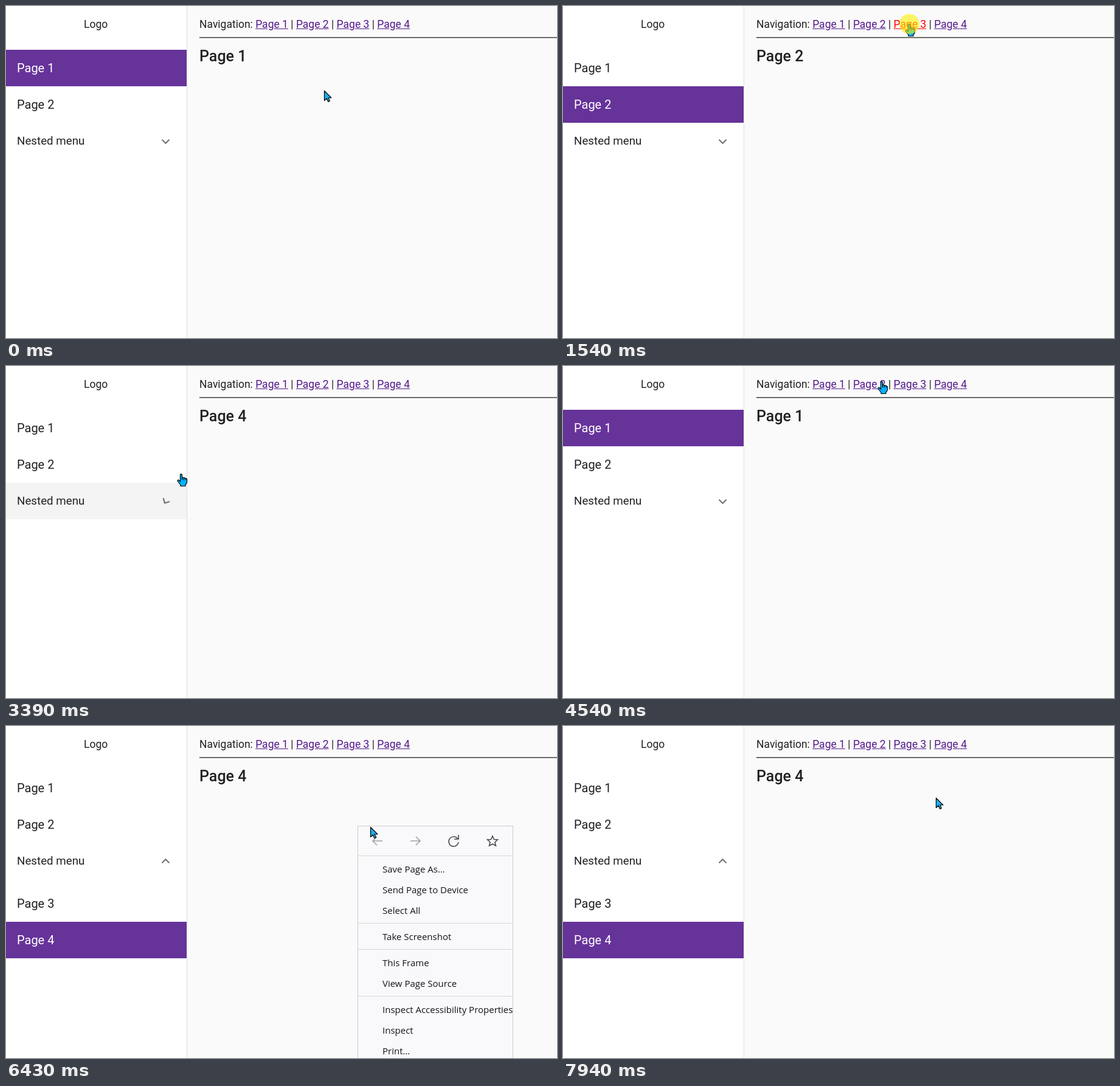
An HTML page that plays this animation: 906 px wide and 546 px high, repeating every 8 s.

```html
<!DOCTYPE html>
<html lang="en">
<head>
<meta charset="utf-8">
<title>Sidebar navigation</title>
<style>
  html, body { margin: 0; width: 100%; height: 100%; overflow: hidden; background: #fff; }
  #stage { position: relative; width: 906px; height: 546px; overflow: hidden; background: #fefefe;
    font-family: Roboto, sans-serif; color: #212121; }
  #stage div, #stage svg { position: absolute; }
  #app { inset: 0; background: #fff; }
  #main { left: 298px; top: 0; width: 608px; height: 545px; background: #fafafa; }
  #side { left: 0; top: 0; width: 297px; height: 545px; background: #fff; border-right: 1px solid #e0e0e0; }
  #logo { left: 128px; top: 15px; font-size: 17.5px; line-height: 30px; }
  #nav { left: 20px; top: 15px; font-size: 17.5px; line-height: 30px; white-space: nowrap; }
  #nav span { color: #551a8b; text-decoration: underline; }
  #nav span.pressed { color: #f00; }
  #rule { left: 20px; top: 51px; width: 588px; height: 1px; background: #555; border-bottom: 1px solid #888; }
  #title { left: 20px; top: 67px; font-size: 25px; line-height: 31px; font-weight: 500; white-space: nowrap; }
  .item { left: 0; width: 279px; padding-left: 18px; height: 60px; line-height: 60px; font-size: 20px; white-space: nowrap; }
  .item.active { background: #639; color: #fff; }
  #nested { top: 192px; font-size: 18.75px; }
  #nested.hover { background: #f4f4f4; }
  #panel { left: 0; top: 252px; width: 297px; overflow: hidden; }
  #menu { left: 578px; top: 164px; width: 254px; height: 400px; background: #f9f9fb; border: 1px solid #ccc;
    font: 15px "Open Sans", sans-serif; color: #15141a; }
  #menu .row { left: 40px; line-height: 34px; white-space: nowrap; }
  #menu .line { left: 0; width: 254px; height: 1px; background: #d8d8dc; }
  #reload { left: 128px; top: 3px; width: 58px; height: 42px; border-radius: 4px; }
  #reload.hover { background: #e0e0e6; }
  #spot { left: -16.5px; top: -16.5px; width: 33px; height: 33px; border-radius: 50%; background: rgba(255, 238, 0, .6); }
  #pointer { left: 0; top: 0; width: 0; height: 0; }
  #pointer svg { left: 0; top: 0; width: 1px; height: 1px; overflow: visible; }
  #pointer path { stroke: #000; stroke-width: 1.2; stroke-linejoin: round; }
</style>
</head>
<body>
<div id="stage">
  <div id="app">
    <div id="main">
      <div id="nav">Navigation: <span>Page 1</span> | <span>Page 2</span> | <span>Page 3</span> | <span>Page 4</span></div>
      <div id="rule"></div>
      <div id="title"></div>
    </div>
    <div id="side">
      <div id="logo">Logo</div>
      <div class="item page" style="top:72px">Page 1</div>
      <div class="item page" style="top:132px">Page 2</div>
      <div class="item" id="nested">Nested menu</div>
      <svg width="297" height="60" style="left:0;top:192px">
        <path id="chevron" d="M-6 -2.8L0 3.2L6 -2.8" fill="none" stroke="#757575" stroke-width="2.2"/>
      </svg>
      <div id="panel">
        <div class="item page" style="top:10px">Page 3</div>
        <div class="item page" style="top:70px">Page 4</div>
      </div>
    </div>
  </div>
  <div id="menu">
    <div id="reload"></div>
    <svg width="254" height="48" fill="none" stroke="#4a4a52" stroke-width="1.6" style="left:0;top:0">
      <path d="M40 24H24M31 17L24 24L31 31" opacity=".5"/>
      <path d="M86 24H102M95 17L102 24L95 31" opacity=".5"/>
      <path d="M164 21A8 8 0 1 0 165 26M165 14V21H158"/>
      <path d="M221 16L223.5 21.5L229.5 22L225 26L226.4 32L221 29L215.6 32L217 26L212.5 22L218.5 21.5Z"/>
    </svg>
  </div>
  <div id="pointer">
    <svg id="arrow"><path fill="#1eaef5" d="M.5 .5V16.5L4.3 13L6.8 18.4L9.4 17.3L7 12H12Z"/></svg>
    <svg id="hand"><path fill="#00b4ff" d="M-1.5 1.6Q0 -.4 1.5 1.6V6L4.5 6.5L7.5 7.5L9.5 9V14Q9 17 7 18V20.5H-1V18.5L-5.8 12.5Q-6.2 10 -4 10.5L-1.5 13ZM1.5 6V10.5M4.5 6.5V10.5M7.5 7.5V10.5"/></svg>
    <div id="spot"></div>
  </div>
</div>
<script>
const LOOP = 8000, STEP = 200 / 3;
const $ = id => document.getElementById(id);
const links = [...document.querySelectorAll('#nav span')];
const items = [...document.querySelectorAll('.page')];

const smooth = p => p * p * (3 - 2 * p);
const easeIn = p => p * p;
const easeOut = p => 1 - (1 - p) ** 2;

// time, x, y, easing towards this point
const path = [
  [20, 523, 139], [533, 503, 34],
  [1080, 503, 34], [1410, 569, 29],
  [1960, 569, 29], [2230, 636, 30],
  [2620, 636, 30], [3140, 274, 216],
  [3270, 274, 216], [3400, 288, 177, easeIn], [3820, 440, 33, easeOut],
  [4360, 440, 33], [4550, 541, 23, easeIn], [4740, 642, 33, easeOut],
  [5520, 642, 33], [5960, 577, 162],
  [6330, 577, 162], [6640, 746, 192],
  [7680, 746, 192], [7933, 613, 118],
];
// press, release, pressed link
const clicks = [
  [730, 800, 2], [1475, 1545, 3], [2280, 2420, 4], [3180, 3260],
  [3880, 4010, 1], [5015, 5080, 4], [6020, 6095], [6775, 6845],
];
const pages = [[0, 1], [800, 2], [1545, 3], [2420, 4], [4010, 1], [5080, 4]];
const toggles = [[-1000, 0], [1545, 1], [3275, 0], [5090, 1], [7060, 0], [7250, 1]];

const latest = (table, t) => table.filter(row => row[0] <= t).pop();
const within = (t, from, to) => t >= from && t < to;

function pointAt(t) {
  const next = path.findIndex(key => key[0] > t);
  if (next === 0) return path[0].slice(1, 3);
  if (next < 0) return path[path.length - 1].slice(1, 3);
  const a = path[next - 1], b = path[next];
  const p = (b[3] || smooth)((t - a[0]) / (b[0] - a[0]));
  return [a[1] + (b[1] - a[1]) * p, a[2] + (b[2] - a[2]) * p];
}

// cubic-bezier(.4, 0, .2, 1)
function standardCurve(x) {
  let lo = 0, hi = 1;
  for (let i = 0; i < 20; i++) {
    const s = (lo + hi) / 2, r = 1 - s;
    if (1.2 * r * r * s + .6 * r * s * s + s ** 3 < x) lo = s; else hi = s;
  }
  return lo * lo * (3 - 2 * lo);
}

function openness(t) {
  const [start, open] = latest(toggles, t);
  const p = standardCurve(Math.min(1, (t - start) / 225));
  return open ? p : 1 - p;
}

function show(id, visible) { $(id).style.display = visible ? '' : 'none'; }

function render(t) {
  const tick = Math.floor((t + 10) / STEP) * STEP;
  const [x, y] = pointAt(tick);
  const [hoverX, hoverY] = pointAt(tick - STEP);
  const click = clicks.find(([from, to]) => within(t, from, to));
  const page = latest(pages, t)[1];
  const open = openness(tick);
  const menuOpen = within(t, 6095, 6845);

  show('app', !within(t, 7055, 7255));
  $('title').textContent = 'Page ' + page;
  links.forEach((link, i) => link.classList.toggle('pressed', !!click && click[2] === i + 1));
  items.forEach((item, i) => item.classList.toggle('active', page === i + 1));
  $('nested').classList.toggle('hover', hoverX < 297 && within(hoverY, 192, 252));
  $('panel').style.height = open * 140 + 'px';
  $('chevron').setAttribute('transform', `translate(262.5 30.5) rotate(${open * 180})`);

  show('menu', menuOpen);
  $('reload').classList.toggle('hover', x > 706);

  const onLink = within(x, 410, 664) && within(y, 20, 43);
  const onSide = x < 297 && y > 72;
  $('pointer').style.transform = `translate(${Math.round(x)}px, ${Math.round(y)}px)`;
  show('hand', onLink || onSide);
  show('arrow', !onLink && !onSide);
  show('spot', !!click);
}

function buildMenu() {
  const groups = [
    ['Save Page As…', 'Send Page to Device', 'Select All'],
    ['Take Screenshot'],
    ['This Frame', 'View Page Source'],
    ['Inspect Accessibility Properties', 'Inspect', 'Print…'],
  ];
  let top = 48;
  const add = (kind, text, height) => {
    const el = document.createElement('div');
    el.className = kind;
    el.textContent = text;
    el.style.top = top + 'px';
    $('menu').append(el);
    top += height;
  };
  for (const group of groups) {
    add('line', '', 5);
    group.forEach(text => add('row', text, 34));
    top += 4;
  }
}

buildMenu();
const begin = performance.now();
function frame() {
  render((performance.now() - begin) % LOOP);
  requestAnimationFrame(frame);
}
frame();
</script>
</body>
</html>
```
